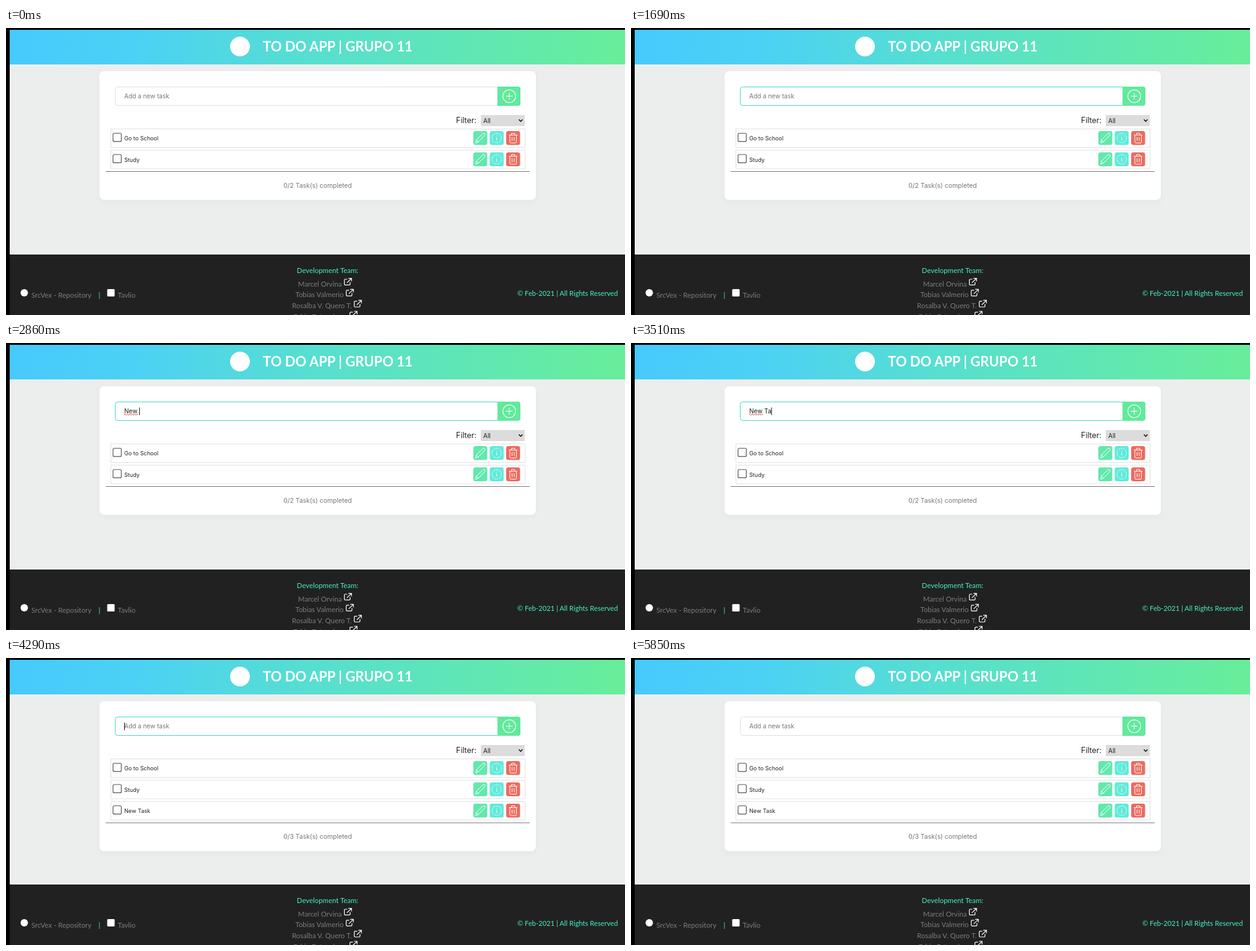
An HTML page that plays this animation: 1000 px wide and 465 px high, repeating every 5980 ms.

```html
<!DOCTYPE html>
<html lang="en">
<head>
<meta charset="utf-8">
<title>To do app</title>
<style>
  html, body { margin: 0; width: 100%; height: 100%; overflow: hidden; background: #000; }
  svg { display: block; width: 100%; height: 100%; }
  text { font: 10px Inter, sans-serif; fill: #222; white-space: pre; }
  .title { font: 700 22px Lato, sans-serif; fill: #fff; }
  .foot text { font: 11.4px Lato, sans-serif; fill: #7c7c7c; }
  .foot .teal { fill: #45f0c4; }
  .foot .hover { fill: #fff; }
  .muted { fill: #777; }
  .line { fill: none; stroke: #fff; stroke-linecap: round; stroke-linejoin: round; }
  .end { text-anchor: end; }
  .mid { text-anchor: middle; }
</style>
</head>
<body>
<svg viewBox="0 0 1000 465">
  <defs>
    <linearGradient id="sky">
      <stop offset="0" stop-color="#46cafd"/>
      <stop offset=".2" stop-color="#4bd1f5"/>
      <stop offset=".5" stop-color="#57dfcf"/>
      <stop offset="1" stop-color="#68ee99"/>
    </linearGradient>
    <filter id="shadow" x="-5%" y="-10%" width="110%" height="125%">
      <feDropShadow dx="0" dy="4" stdDeviation="5" flood-opacity=".03"/>
    </filter>
    <g id="row">
      <rect x="169.5" y="163.5" width="669" height="30" fill="#fff" stroke="#e2e2e2"/>
      <rect x="172.9" y="170.5" width="13.4" height="13.4" rx="2" fill="#fff" stroke="#555" stroke-width="1.2"/>
      <rect x="755" y="167" width="22.5" height="22.5" rx="3.5" fill="#62e8ad"/>
      <rect x="781.5" y="167" width="22.5" height="22.5" rx="3.5" fill="#62ead9"/>
      <rect x="808" y="167" width="22.5" height="22.5" rx="3.5" fill="#ed6a5e"/>
      <path class="line" d="M758.8 185.8l1.2-4.6 10.6-10.4q1.6-1 2.8.2t.2 2.8l-10.4 10.6zM760 181.2l3.2 3.2"/>
      <circle class="line" cx="792.8" cy="178.3" r="7.6" stroke-width=".9" stroke-dasharray="1.6 1.8"/>
      <path class="line" d="M792.8 177.5v4.2M792.8 174.6v.3"/>
      <path class="line" d="M812.8 173.4h13M816.6 173.2v-2.6h5.4v2.6M814 173.6v11q0 1.6 1.6 1.6h7.4q1.6 0 1.6-1.6v-11M817.6 177v5.5M821 177v5.5"/>
    </g>
    <path id="link" class="line" stroke-width="1.2" d="M5 2H2q-1.4 0-1.4 1.4V10q0 1.4 1.4 1.4h6.5q1.4 0 1.4-1.4V7M7.6.6h4.6v4.4M12 .8L5 7.6"/>
  </defs>

  <rect x="6" y="3" width="994" height="462" fill="#eceeed"/>
  <rect x="6" y="3" width="994" height="56" fill="url(#sky)"/>
  <circle cx="378" cy="30" r="16" fill="#fff"/>
  <text class="title" x="415" y="38">TO DO APP | GRUPO 11</text>

  <rect id="card" x="151" y="70" width="705" height="208.5" rx="8" fill="#fff" filter="url(#shadow)"/>
  <rect id="field" x="176.5" y="95.5" width="654" height="30" rx="4" fill="#fff"/>
  <path d="M794 95h33q4 0 4 4v23q0 4-4 4h-33z" fill="#62e99c"/>
  <path id="buttonEdge" d="M794.5 95.5h32q4 0 4 4v22q0 4-4 4h-32z" fill="none" stroke="#52dfae"/>
  <circle class="line" cx="813" cy="110.5" r="10.3" stroke-width="1.1"/>
  <path class="line" d="M808 110.5h10M813 105.5v10"/>
  <text id="entry" x="191" y="114.3"></text>
  <path id="squiggle" fill="none" stroke="#e0443e" stroke-width=".9"/>
  <rect id="caret" y="104.5" width="1" height="12.5" fill="#111"/>

  <text class="end" x="760" y="154" style="font-size:12.4px">Filter:</text>
  <rect x="767" y="141" width="71" height="18" fill="#dcdcdc"/>
  <text x="771" y="153.5">All</text>
  <path d="M828.5 148.2l3 3 3-3" fill="none" stroke="#111" stroke-width="1.6"/>

  <g id="rows"></g>
  <g id="summary">
    <path d="M161 232.5h685" stroke="#777"/>
    <text id="count" class="muted mid" x="503.5" y="258.6" style="font-size:10.4px"></text>
  </g>

  <g class="foot">
    <rect x="6" y="367" width="994" height="98" fill="#212121"/>
    <circle cx="29.5" cy="429" r="6" fill="#fff"/>
    <text x="41" y="436.5">SrcVex - Repository</text>
    <text class="teal mid" x="151" y="436.5">|</text>
    <rect x="163.5" y="423" width="12" height="12" rx="1.5" fill="#fff"/>
    <text x="180.5" y="436.5">Tavlio</text>
    <text class="teal mid" x="519.5" y="396.5">Development Team:</text>
    <g id="team"></g>
    <text class="teal end" x="988.5" y="434" style="font-size:11.2px">© Feb-2021 | All Rights Reserved</text>
  </g>
</svg>
<script>
const LOOP = 5980, ROW = 34.5, TEXT_X = 191;
const FOCUS = 1040, SUBMIT = 4290, BLUR = 5850;
const typing = [[0, ''], [2470, 'N'], [2600, 'New'], [2860, 'New '], [3250, 'New T'],
  [3510, 'New Ta'], [3640, 'New Tas'], [3770, 'New Task'], [SUBMIT, '']];
const caretSpans = [[FOCUS, 1690], [2080, 4940], [5460, BLUR]];
const hoverSpan = [5330, 5460];
const tasks = ['Go to School', 'Study', 'New Task'];
const team = [['Marcel Orvina', 546], ['Tobias Valmerio', 549], ['Rosalba V. Quero T.', 562], ['Fabio E. Lundarez', 555]];

const $ = id => document.getElementById(id);
const within = (t, [from, to]) => t >= from && t < to;

$('rows').innerHTML = tasks.map((name, i) => `<g transform="translate(0 ${i * ROW})">
  <use href="#row"/><text x="${TEXT_X}" y="182" style="font-size:9.1px">${name}</text></g>`).join('');
$('team').innerHTML = team.map(([name, x], i) => `<text class="end" x="${x - 3.5}" y="${418.6 + i * 17.8}">${name}</text>
  <use href="#link" x="${x}" y="${405 + i * 17.8}"/>`).join('');
const lastRow = $('rows').lastElementChild;
const hovered = $('team').querySelectorAll('text')[2];

let wave = `M${TEXT_X} 116`;
for (let i = 0; i < 11; i++) wave += `q1 ${i % 2 ? 2 : -2} 2 0`;
$('squiggle').setAttribute('d', wave);

function show(id, visible) {
  $(id).style.display = visible ? '' : 'none';
}

function draw(t) {
  const typed = typing.filter(([start]) => t >= start).pop()[1];
  const focused = within(t, [FOCUS, BLUR]);
  const added = t >= SUBMIT;
  const entry = $('entry');

  entry.textContent = typed || 'Add a new task';
  entry.setAttribute('class', typed ? '' : 'muted');
  $('caret').setAttribute('x', TEXT_X + (typed ? entry.getComputedTextLength() : 0));
  show('caret', caretSpans.some(span => within(t, span)));
  show('squiggle', typed.startsWith('New '));
  $('field').setAttribute('stroke', focused ? '#43d9c4' : '#dedede');
  show('buttonEdge', !focused);

  lastRow.style.display = added ? '' : 'none';
  $('card').setAttribute('height', 208.5 + added * ROW);
  $('summary').setAttribute('transform', `translate(0 ${added * ROW})`);
  $('count').textContent = `0/${added ? 3 : 2} Task(s) completed`;
  hovered.classList.toggle('hover', within(t, hoverSpan));
}

const start = performance.now();
function frame() {
  draw((performance.now() - start) % LOOP);
  requestAnimationFrame(frame);
}
frame();
</script>
</body>
</html>
```
